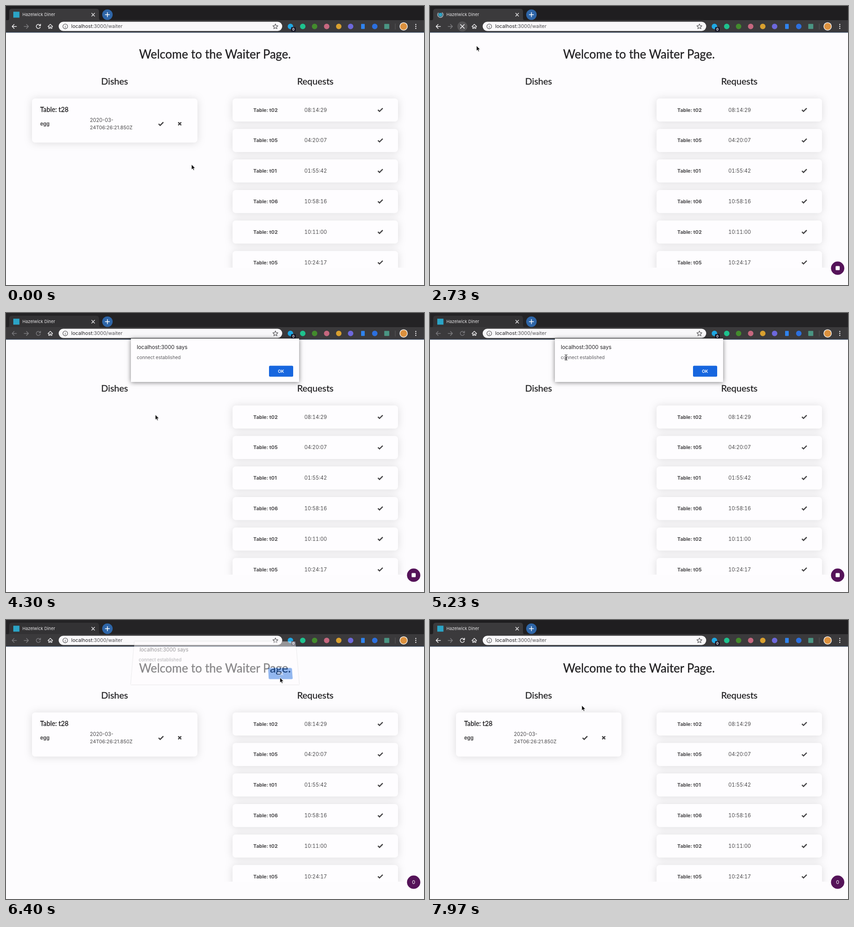
These frames come from a looping animation (917 px wide and 611 px high, 8 s). An HTML page:

```html
<!DOCTYPE html>
<html lang="en">
<head>
<meta charset="utf-8">
<title>Waiter page</title>
<style>
html, body { margin: 0; width: 100%; height: 100%; overflow: hidden; background: #fdfcfe; }
svg { position: absolute; left: 0; top: 0; overflow: visible; font: 11.1px Inter, sans-serif; }
.list { overflow: hidden; }
.lato { font-family: Lato, sans-serif; fill: #212022; stroke: #212022; stroke-width: .3; }
.mid { text-anchor: middle; }
.bold { font-weight: 700; }
.body { fill: #4b4a4c; }
.num { font-variant-numeric: tabular-nums; }
.line { fill: none; stroke-linecap: round; stroke-linejoin: round; }
.mark { fill: none; stroke: #454446; stroke-width: 2.5; }
.cards { fill: #fefdff; filter: drop-shadow(0 1px 9px rgba(0,0,0,.13)); }
.dialog {
  left: 274px; top: 56px; width: 369px; height: 95px; background: #fefdff;
  transform-origin: 50% 100%; animation: dialog 8s linear infinite;
}

/* Hard switches */
.step { animation: 8s step-end infinite; }
.strip { animation-name: strip; }
.tab { animation-name: tab; }
.nav { stroke: #f0eff1; animation-name: nav; }
.dishes { animation-name: dishes; }
.idle { animation-name: idle; }
.busy { animation-name: busy; }
.hover { animation-name: hover; }
.badge { animation-name: badge; }
.ghost { animation-name: ghost; }
.zero { animation-name: zero; }
.arrow { animation-name: arrow; }
.beam { animation-name: beam; }
@keyframes strip { 0%, 81% { fill: #1f1e20 } 48.25% { fill: #242325 } }
@keyframes tab { 0%, 81% { fill: #3b3a3c } 48.25% { fill: #333234 } }
@keyframes nav { 0%, 81% { stroke: #f0eff1 } 48.25% { stroke: #77767a } }
@keyframes dishes { 0%, 79% { opacity: 1 } 28.75% { opacity: 0 } }
@keyframes idle { 0%, 42.5% { opacity: 1 } 24.1% { opacity: 0 } }
@keyframes busy { 0%, 42.5% { opacity: 0 } 24.1% { opacity: 1 } }
@keyframes hover { 0%, 40.4% { opacity: 0 } 15.6% { opacity: 1 } }
@keyframes badge { 0% { opacity: 0 } 29.4% { opacity: 1 } }
@keyframes ghost { 0% { opacity: 1 } 79% { opacity: 0 } }
@keyframes zero { 0% { opacity: 0 } 79% { opacity: 1 } }
@keyframes arrow { 0%, 66.6% { opacity: 1 } 58.1% { opacity: 0 } }
@keyframes beam { 0%, 66.6% { opacity: 0 } 58.1% { opacity: 1 } }

/* Motion */
.spin { animation: spin 8s linear infinite; }
.status { animation: status 8s linear infinite; }
.cursor { animation: cursor 8s ease-in-out infinite; }
@keyframes spin {
  0%, 24.1% { transform: rotate(0deg) }
  25.4%, 27.1% { transform: rotate(60deg) }
  34.1%, 40% { transform: rotate(400deg) }
  42.5%, 100% { transform: rotate(520deg) }
}
@keyframes status {
  0%, 40.4% { opacity: 0 }
  40.5%, 46% { opacity: 1 }
  48%, 100% { opacity: 0 }
}
@keyframes dialog {
  0%, 48.75%, 81.25%, 100% {
    opacity: 0; box-shadow: 0 0 2px rgba(0,0,0,.4);
    transform: matrix3d(1,0,0,0, 0,1.09,0,-.00094, 0,0,1,0, 0,-19,0,1);
  }
  50.5%, 78.75% {
    opacity: 1; box-shadow: 0 1px 10px rgba(0,0,0,.5);
    transform: matrix3d(1,0,0,0, 0,1,0,0, 0,0,1,0, 0,0,0,1);
  }
  80% {
    opacity: .47; box-shadow: 0 0 2px rgba(0,0,0,.4);
    transform: matrix3d(1,0,0,0, 0,1.045,0,-.00047, 0,0,1,0, 0,-9.5,0,1);
  }
}
@keyframes cursor {
  0%, .2% { transform: translate(407px, 347px) }
  5%, 8.6% { transform: translate(224px, 212px) }
  16.3%, 17.4% { transform: translate(62.5px, 50px) }
  18.75%, 27.1% { transform: translate(67px, 49px) }
  34.1%, 40% { transform: translate(102px, 87px) }
  45.9% { transform: translate(337px, 286px) }
  50%, 50.4% { transform: translate(341px, 281px) }
  59%, 65.6% { transform: translate(298.5px, 97px) }
  70.9%, 81.6% { transform: translate(601px, 126px); animation-timing-function: ease-in }
  86.5% { transform: translate(330px, 330px); animation-timing-function: ease-out }
  90%, 92.1% { transform: translate(138px, 309px) }
  99.2%, 100% { transform: translate(333px, 187px) }
}
</style>
</head>
<body>
<svg width="917" height="611" viewBox="0 0 917 611">
  <rect width="917" height="611" fill="#fdfcfe"/>

  <!-- Browser frame -->
  <rect class="step strip" width="917" height="32"/>
  <path class="step tab" d="M2 32Q7 32 7 26V12Q7 6 13 6H198Q204 6 204 12V26Q204 32 209 32Z"/>
  <rect y="31" width="917" height="27" fill="#3b3a3c"/>
  <rect y="57" width="917" height="1.4" fill="#35455c"/>
  <rect class="step idle" x="16" y="12.5" width="13.5" height="13" fill="#2ba4c6"/>
  <g class="step busy" transform="translate(22.8 19)">
    <circle r="4" fill="#2ba4c6"/>
    <path class="spin line" d="M0-5.9A5.9 5.9 0 1 1-5.9 0" stroke="#c3d8e6" stroke-width="1.4"/>
  </g>
  <text x="36" y="22.3" font-size="9.4" fill="#e6e5e7">Hazelwick Diner</text>
  <path class="line" d="M188 15.8l6.4 6.4m0-6.4l-6.4 6.4" stroke="#e6e5e7" stroke-width="1.4"/>
  <circle cx="222.5" cy="19" r="11.5" fill="#2e65a7"/>
  <path class="line" d="M217.8 19h9.4M222.5 14.3v9.4" stroke="#fff" stroke-width="1.6"/>

  <circle class="step hover" cx="71" cy="44.7" r="11" fill="#555456"/>
  <g class="line" stroke-width="1.5">
    <path class="step nav" d="M23 44.7H13.4m4.4-4.4l-4.4 4.4 4.4 4.4"/>
    <path d="M39.7 44.7h9.6m-4.4-4.4l4.4 4.4-4.4 4.4" stroke="#7b7a7d"/>
    <g class="step idle">
      <path class="step nav" d="M75.2 46.2A4.5 4.5 0 1 1 74.2 41.5L75.6 43M75.8 39.8V43.2H72.2"/>
    </g>
    <path class="step busy" d="M66.8 40.5l8.4 8.4m0-8.4l-8.4 8.4" stroke="#f0eff1"/>
    <path d="M92 45l5.2-5 5.2 5M93.7 44.2v5h2.3v-3.2h2.4v3.2h2.3v-5" stroke="#f0eff1" stroke-width="1.3"/>
  </g>
  <rect x="115.5" y="34.5" width="490.5" height="20.2" rx="10.1" fill="#f9f8fa"/>
  <g class="line" stroke="#4c4b4e" stroke-width="1.1">
    <circle cx="130" cy="44.7" r="5.2"/>
    <path d="M130 44.4v2.8M130 42v.1"/>
    <path d="M591 39.2l1.6 3.7 4 .4-3 2.7.9 3.9-3.5-2.1-3.5 2.1.9-3.9-3-2.7 4-.4Z"/>
  </g>
  <text x="143" y="48.4" font-size="10.9" fill="#242326">localhost<tspan fill="#545357">:3000/waiter</tspan></text>
  <g id="tools"></g>
  <rect x="625.5" y="46.3" width="10" height="9.4" rx="1.5" fill="#141326"/>
  <text class="mid bold" x="630.5" y="53.8" font-size="7.5" fill="#fff">0</text>
  <rect x="853.5" y="38.5" width="1" height="13" fill="#5a595c"/>
  <circle cx="872.3" cy="44.7" r="9" fill="#f4f0ec"/>
  <circle cx="872.3" cy="44.7" r="7.5" fill="#dc913e"/>
  <path class="line" d="M899 40.5v.1M899 44.7v.1M899 48.9v.1" stroke="#f0eff1" stroke-width="2.5"/>

  <!-- Page -->
  <g class="lato mid">
    <text x="458.5" y="115" font-size="26">Welcome to the Waiter Page.</text>
    <text x="238.3" y="171.5" font-size="20">Dishes</text>
    <text x="678.6" y="171.5" font-size="20">Requests</text>
  </g>
  <g class="step dishes">
    <rect class="cards" x="57" y="202.5" width="363" height="96.5" rx="7"/>
    <text class="lato" x="75" y="231.6" font-size="14.4">Table: t28</text>
    <g class="body">
      <text class="bold" x="75" y="261.8">egg</text>
      <text x="184" y="253.7">2020-03-</text>
      <text x="184" y="269.8" font-size="10.8">24T06:26:21.850Z</text>
    </g>
    <path class="mark" d="M334.8 258.2l3.4 3.3 7-7M377.8 254.6l6.6 6.6m0-6.6l-6.6 6.6"/>
  </g>
  <svg class="list" x="477" y="180" width="400" height="393" viewBox="477 180 400 393">
    <g class="cards" id="cards"></g>
    <g id="rows"></g>
  </svg>

  <g class="step badge">
    <circle cx="894.3" cy="574.2" r="14.6" fill="#551359"/>
    <rect class="step ghost" x="889.8" y="569.4" width="9" height="9" rx="1.5" fill="#fff"/>
    <text class="step zero mid" x="894.3" y="578" font-size="11" fill="#fff">0</text>
  </g>
  <g class="status">
    <path d="M0 596H301Q304 596 304 599V611H0Z" fill="#bfd5ec"/>
    <text x="4" y="607" font-size="9.3" fill="#fff">Processing request...</text>
  </g>
</svg>

<svg class="dialog" viewBox="0 0 369 95">
  <text x="13" y="23.3" font-size="11.7" fill="#242326">localhost:3000 says</text>
  <text x="13" y="44.6" font-size="10.1" fill="#5c5b5f">connect established</text>
  <rect x="303" y="59.6" width="53" height="23.8" rx="2.5" fill="#1766df"/>
  <text class="mid" x="329.3" y="74.8" font-size="9.4" font-weight="600" fill="#fff">OK</text>
</svg>

<svg width="917" height="611" viewBox="0 0 917 611">
  <g class="cursor">
    <path class="step arrow" d="M0 0V11.3L2.6 9 4.3 12.9 6.2 12.1 4.5 8.2H8Z" fill="#0b0a0c" stroke="#fff" stroke-width=".8"/>
    <path class="step beam line" d="M-2.5-5.5Q0-5.5 0-3.5Q0-5.5 2.5-5.5M0-3.5V4M-2.5 6Q0 6 0 4Q0 6 2.5 6M-1.5 1.8h3" stroke="#1b1a1c" stroke-width="1.1"/>
  </g>
</svg>

<script>
const fill = (id, parts) => { document.getElementById(id).innerHTML = parts.join(''); };

const dot = (x, color) => `<circle cx="${x}" cy="44.7" r="6" fill="${color}"/>`;
const box = (x, w, color) => `<rect x="${x - w / 2}" y="39.2" width="${w}" height="11" rx="1" fill="${color}"/>`;
fill('tools', [
  dot(624, '#1fa8e4'), dot(651, '#1ec28e'), dot(677, '#438b2d'), dot(703.5, '#c6677f'),
  dot(730, '#d9a02f'), dot(756, '#6d68dc'), box(783, 8, '#2f83ee'), dot(809, '#2c70df'),
  box(835.3, 11, '#4a9583')
]);

const requests = [
  ['t02', '08:14:29'], ['t05', '04:20:07'], ['t01', '01:55:42'],
  ['t06', '10:58:16'], ['t02', '10:11:00'], ['t05', '10:24:17']
];
const rowY = i => 202.5 + i * 66.8;
fill('cards', requests.map((_, i) =>
  `<rect x="497" y="${rowY(i)}" width="363" height="50.5" rx="7"/>`));
fill('rows', requests.map(([table, time], i) => `
  <g transform="translate(0 ${rowY(i)})" class="body">
    <text class="bold" x="542.5" y="29" font-size="10.9">Table: ${table}</text>
    <text class="num" x="654.5" y="29" font-size="11.2">${time}</text>
    <path class="mark" d="M816 25l3.4 3.3 7-7"/>
  </g>`));
</script>
</body>
</html>
```
